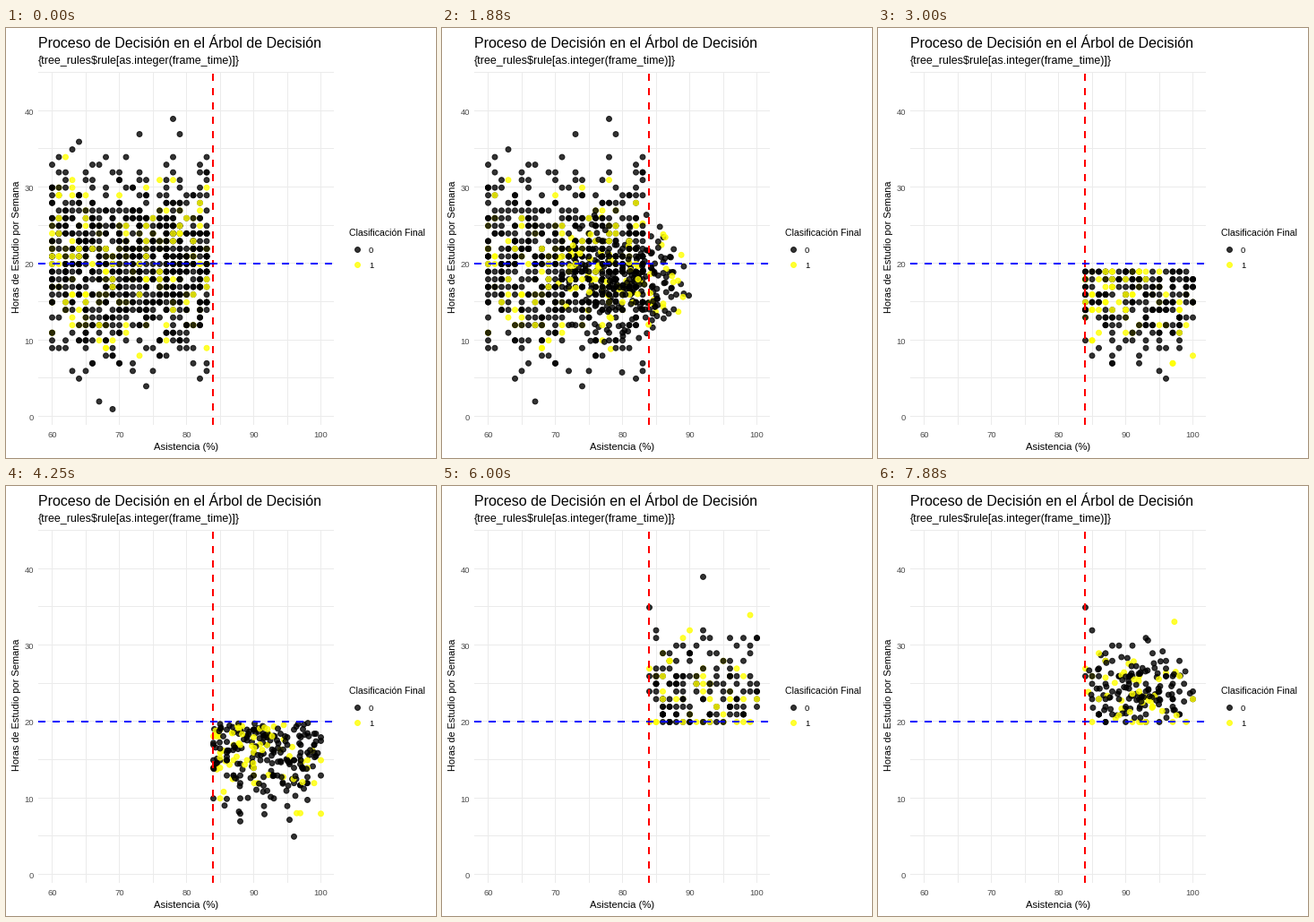
A matplotlib script for the animation above (8000 ms loop, 480 by 480 pixels).

```python
import matplotlib.pyplot as plt
import numpy as np
from matplotlib.animation import FuncAnimation

plt.rcParams["font.family"] = "Liberation Sans"
SIZE, DPI = 480, 100
PX = 72 / DPI                       # points per pixel
FRAMES, STEP = 64, 125
LEFT, RIGHT, TOP, BOTTOM = 36, 366, 50, 443
CUT_X, CUT_Y = 84, 20

BLACK, YELLOW = (0, 0, 0, 0.8), (1, 1, 0, 0.8)
DOT = dict(s=(5.9 * PX) ** 2, linewidths=PX)

# last still frame and arrival frame of each transition
MOVES = [(8, 24), (33, 48), (56, 72)]

# attendance and study-hours range of each state
REGIONS = [(60, 83, 4, 34), (84, 100, 6, 19), (84, 100, 20, 32), (84, 100, 20, 31)]

rng = np.random.default_rng(12)


def sx(x):
    return 51.5 + 7.5 * (np.asarray(x) - 60)


def sy(y):
    return 434.0 - 8.527 * np.asarray(y)


def cloud(n, x0, x1, y0, y1):
    """Integer students: uniform attendance, clipped normal study hours."""
    hours = np.rint(rng.normal(20, 6, 20 * n))
    hours = hours[(hours >= y0) & (hours <= y1)][:n]
    return np.column_stack([rng.integers(x0, x1 + 1, n), hours]).astype(float)


def make_group(*sizes):
    return [cloud(n, *region) for n, region in zip(sizes, REGIONS)]


dark = make_group(830, 202, 145, 88)
bright = make_group(170, 68, 48, 30)

# extreme students: the first rows travel, the last ones stay
dark[0][:2] = (69, 1), (64, 36)
dark[0][-5:] = (78, 39), (73, 37), (79, 37), (63, 35), (67, 2)
dark[1][:2] = (94, 12), (91, 14)
dark[1][-1] = 96, 5
dark[2][1] = 92, 39
dark[2][-1] = 84, 35
dark[3][1] = 95, 20
bright[2][0] = 99, 34
bright[3][0] = 95, 32

dark_rank = rng.random(len(dark[0]))
bright_rank = rng.random(len(bright[0]))


def travel(states, k, t):
    """Group positions on the way from state k to k + 1."""
    goal = states[k + 1]
    if t >= 1:
        return goal
    pts = states[k].copy()
    pts[:len(goal)] += t * (goal - pts[:len(goal)])
    return pts


def students(frame):
    k = sum(frame >= end for _, end in MOVES)
    start, end = MOVES[k]
    t = max(0, (frame - start) / (end - start))
    a, b = travel(dark, k, t), travel(bright, k, t)
    row = np.argsort(np.concatenate([dark_rank[:len(a)], bright_rank[:len(b)]]))
    pts = np.vstack([a, b])[row]
    tint = np.array([BLACK] * len(a) + [YELLOW] * len(b))[row]
    return np.column_stack([sx(pts[:, 0]), sy(pts[:, 1])]), tint


fig = plt.figure(figsize=(SIZE / DPI, SIZE / DPI), dpi=DPI, facecolor="white")
ax = fig.add_axes([0, 0, 1, 1])
ax.set(xlim=(0, SIZE), ylim=(SIZE, 0))
ax.axis("off")


def label(x, y, text, size, color="black", **kw):
    ax.text(x, y, text, fontsize=size * PX, color=color, **kw)


def line(xs, ys, color, width, **kw):
    ax.plot(xs, ys, color=color, lw=width * PX, snap=False,
            solid_capstyle="butt", dash_capstyle="butt", **kw)


def grid_row(y):
    return np.floor(sy(y) - 0.65) + 0.5


for x in range(60, 101, 5):
    line([np.floor(sx(x)) + 0.5] * 2, [TOP, BOTTOM], "#ebebeb", 1, zorder=1)
for y in range(0, 46, 5):
    line([LEFT, RIGHT], [grid_row(y)] * 2, "#ebebeb", 1, zorder=1)
for x in range(60, 101, 10):
    label(sx(x), 457, str(x), 9.5, "#4d4d4d", ha="center")
for y in range(0, 41, 10):
    label(31, sy(y) + 4, str(y), 9.5, "#4d4d4d", ha="right")

label(36, 22, "Proceso de Decisión en el Árbol de Decisión", 16)
label(36, 40, "{tree_rules\\$rule[as.integer(frame_time)]}", 12.5)
label(201, 471, "Asistencia (%)", 11.2, ha="center")
label(12.5, 244.5, "Horas de Estudio por Semana", 11, rotation=90,
      ha="center", va="center")
label(383, 232, "Clasificación Final", 10.5)
for y, name, tint in (246.5, "0", BLACK), (264, "1", YELLOW):
    ax.scatter(391.5, y, color=[tint], **DOT)
    label(405, y + 4.5, name, 9.5)

dots = ax.scatter([], [], zorder=2, **DOT)
dashes = dict(ls=(0, (4, 4)), zorder=3)
line([sx(CUT_X) - 0.5] * 2, [BOTTOM, TOP], "red", 2, **dashes)
line([LEFT, RIGHT], [grid_row(CUT_Y) + 0.5] * 2, "blue", 2, **dashes)


def draw(frame):
    pos, tint = students(frame)
    dots.set_offsets(pos)
    dots.set_color(tint)
    return dots,


anim = FuncAnimation(fig, draw, frames=FRAMES, interval=STEP, repeat=True,
                     repeat_delay=0, blit=False)
plt.show()
```
